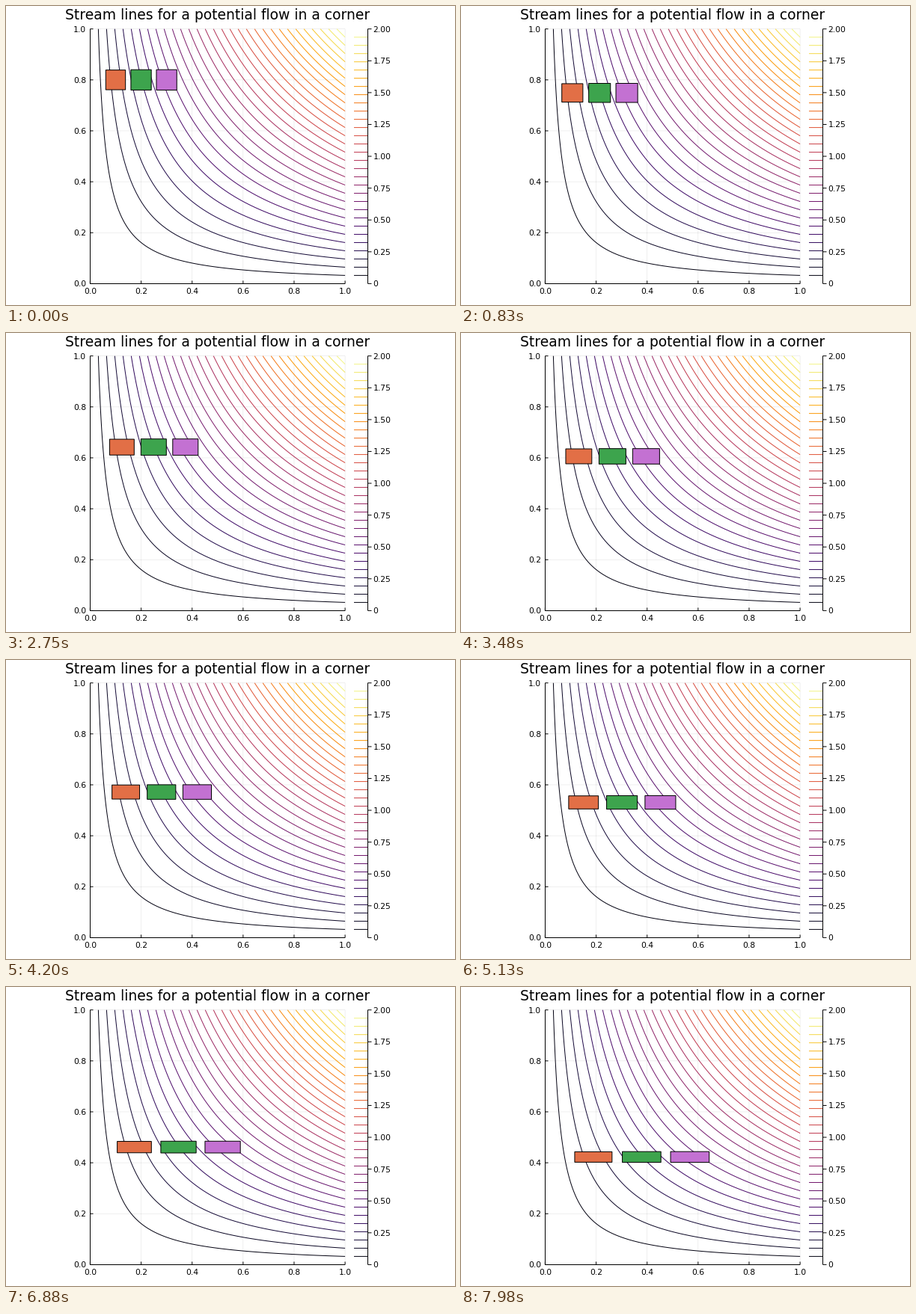
A matplotlib script that plays this animation: 600x400 px, repeating every 8000 ms.

```python
import numpy as np
import matplotlib.pyplot as plt
from matplotlib.animation import FuncAnimation
from matplotlib.collections import LineCollection
from matplotlib.patches import Rectangle

W, H, DPI = 600, 400, 100
PX = 72 / DPI                      # points per pixel
LEFT, BOTTOM, SIDE = 112.4, 371.4, 340.7
BAR_LEFT, BAR_RIGHT = 465, 483.5
FRAMES, INTERVAL = 320, 25
RATE = 0.002                       # stretching per frame

plt.rcParams["font.family"] = "DejaVu Sans"


def sx(x):
    return LEFT + SIDE * x


def sy(y):
    return BOTTOM - SIDE * y


fig = plt.figure(figsize=(W / DPI, H / DPI), dpi=DPI, facecolor="white")
ax = fig.add_axes([0, 0, 1, 1])
ax.set(xlim=(0, W), ylim=(H, 0))
ax.axis("off")


def add_lines(segments, colors="black", width=1.0, z=2, **kw):
    ax.add_collection(LineCollection(segments, colors=colors, linewidths=width * PX,
                                     zorder=z, snap=False, **kw), autolim=False)


def label(x, y, text, size=10.7, **kw):
    ax.text(x, y, text, fontsize=size * PX, va="baseline", **kw)


# Grid, axes and ticks
ticks = np.linspace(0, 1, 6)
grid = [[(sx(t), sy(0)), (sx(t), sy(1))] for t in ticks]
grid += [[(sx(0), sy(t)), (sx(1), sy(t))] for t in ticks]
add_lines(grid, width=0.6, z=1, alpha=0.1)

frame = [[(112.5, sy(1)), (112.5, 371.5)], [(112.5, 371.5), (sx(1), 371.5)]]
frame += [[(sx(t), 371.5), (sx(t), 367.5)] for t in ticks]
frame += [[(112.5, sy(t)), (116.5, sy(t))] for t in ticks]
add_lines(frame, z=4)

for t in ticks:
    label(sx(t), 385, f"{t:.1f}", ha="center")
    label(107, sy(t) + 4, f"{t:.1f}", ha="right")

# Stream lines 2xy = c and their colour bar
levels = 2 * np.arange(1, 31) / 31
colors = plt.get_cmap("inferno")(levels / 2)
curves = []
for c in levels:
    x = np.geomspace(c / 2, 1, 120)
    curves.append(np.column_stack([sx(x), sy(c / (2 * x))]))
add_lines(curves, colors)
add_lines([[(BAR_LEFT, sy(c / 2)), (BAR_RIGHT, sy(c / 2))] for c in levels], colors)

bar_ticks = np.linspace(0, 2, 9)
bar = [[(BAR_RIGHT, sy(1)), (BAR_RIGHT, sy(0))]]
bar += [[(BAR_RIGHT, sy(v / 2)), (488.5, sy(v / 2))] for v in bar_ticks]
add_lines(bar, z=4)
for v in bar_ticks:
    label(490.5, sy(v / 2) + 4, f"{v:.2f}" if v else "0")

label(282.4, 18, "Stream lines for a potential flow in a corner", 18.75, ha="center")

# Fluid parcels: centre x, half side, colour; all start at y = 0.8
parcels = [(0.1, 0.0387, "#e26f46"), (0.2, 0.04, "#3da44d"), (0.3, 0.04, "#c371d2")]
boxes = [ax.add_patch(Rectangle((0, 0), 1, 1, facecolor=color, edgecolor="black",
                                linewidth=PX, zorder=5, snap=False))
         for _, _, color in parcels]


def update(i):
    s = np.exp(RATE * i)
    for box, (x, half, _) in zip(boxes, parcels):
        box.set_bounds(sx((x - half) * s), sy((0.8 + half) / s),
                       2 * half * s * SIDE, 2 * half / s * SIDE)
    return boxes


anim = FuncAnimation(fig, update, frames=FRAMES, interval=INTERVAL,
                     init_func=lambda: update(0), repeat=True, repeat_delay=0)
plt.show()
```
